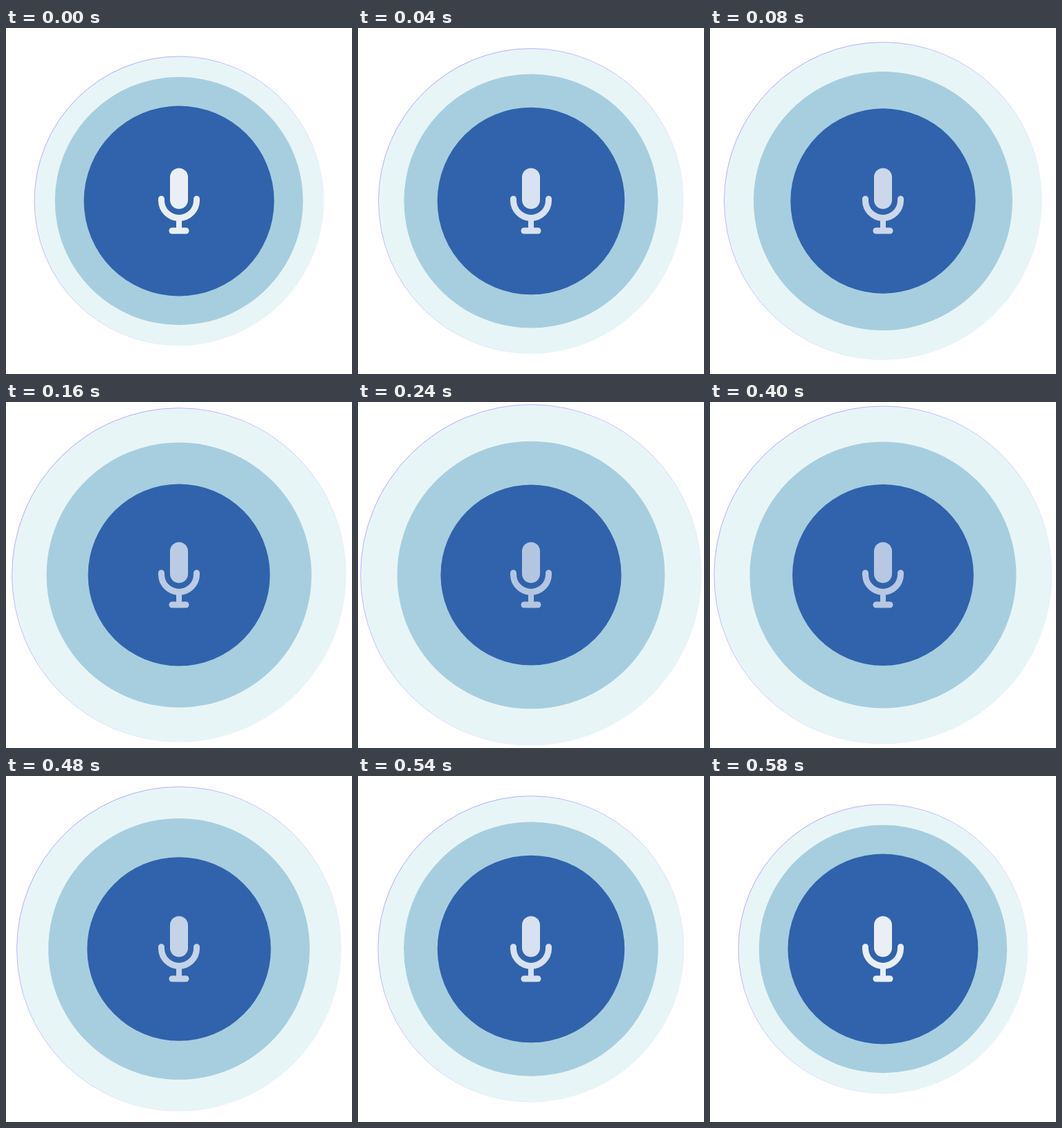
An HTML page for the animation above (600 ms loop, 500x500 px).

```html
<!DOCTYPE html>
<html lang="en">
<head>
<meta charset="utf-8">
<title>Microphone pulse</title>
<style>
  html, body { margin: 0; width: 100%; height: 100%; overflow: hidden; background: #fff; }
  svg { display: block; width: 100%; height: 100%; }
</style>
</head>
<body>
<svg viewBox="0 0 500 500">
  <defs>
    <linearGradient id="rim" x1="0.1" y1="0.1" x2="0.85" y2="0.85">
      <stop offset="0" stop-color="#8f7cff" stop-opacity="0.9"/>
      <stop offset="0.5" stop-color="#a79aff" stop-opacity="0.6"/>
      <stop offset="1" stop-color="#d8d4ff" stop-opacity="0"/>
    </linearGradient>
  </defs>
  <circle id="outer" cx="250" cy="250" fill="#e8f5f7" stroke="url(#rim)" stroke-width="0.8"/>
  <circle id="middle" cx="250" cy="250" fill="#a7cedf"/>
  <circle id="inner" cx="250" cy="250" fill="#3063ac"/>
  <g id="mic" fill="none" stroke="#fff" stroke-width="9" stroke-linecap="round">
    <rect x="237" y="202.5" width="26" height="59" rx="13" fill="#fff" stroke="none"/>
    <path d="M224.5 247V249A25.5 25.5 0 0 0 275.5 249V247"/>
    <path d="M250 275V293" stroke-width="8" stroke-linecap="butt"/>
    <path d="M240 293H260"/>
  </g>
</svg>
<script>
  const LOOP = 600, STEP = 20, PEAK = 300, END = 580;
  const [outer, middle, inner, mic] =
    ["outer", "middle", "inner", "mic"].map(id => document.getElementById(id));
  const mix = (a, b, p) => a + (b - a) * p;

  // Fast away from rest, slow around the peak
  function pulse(t) {
    const d = t < PEAK ? (PEAK - t) / PEAK : (t - PEAK) / (END - PEAK);
    return 1 - Math.pow(d, 2.5);
  }

  function draw(ms) {
    const t = Math.floor((ms % LOOP) / STEP) * STEP;
    const p = pulse(t);
    outer.setAttribute("r", mix(209, 247, p));
    middle.setAttribute("r", mix(179.3, 193.6, p));
    inner.setAttribute("r", mix(137.5, 130.4, p));
    mic.setAttribute("opacity", mix(0.9, 0.63, p));
  }

  const start = performance.now();
  function tick() {
    draw(performance.now() - start);
    requestAnimationFrame(tick);
  }
  tick();
</script>
</body>
</html>
```
